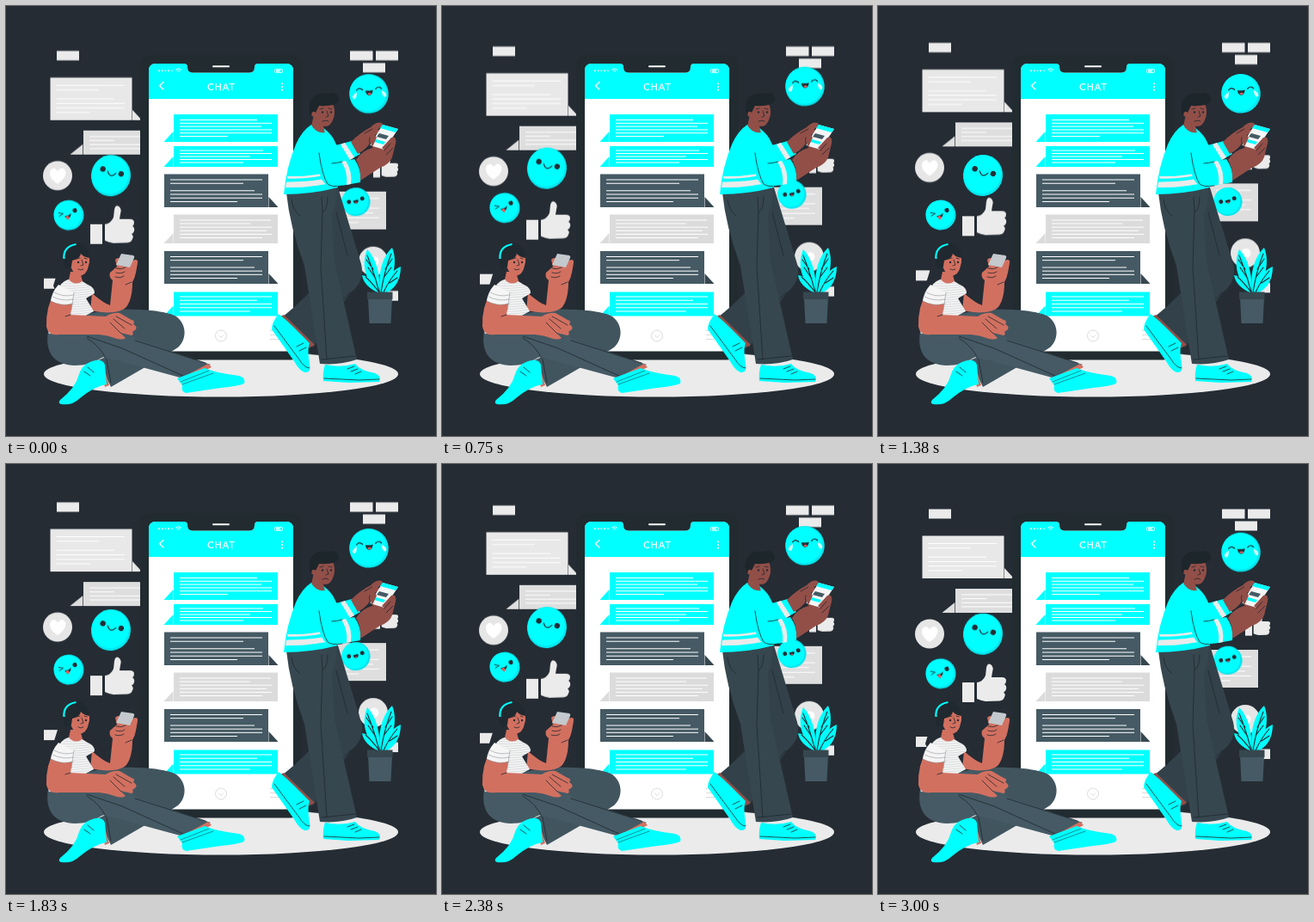
Animation, 500 px wide and 500 px high, one loop 3040 ms. Source, as an HTML page:

```html
<!DOCTYPE html>
<html lang="en">
<head>
<meta charset="utf-8">
<title>Chat</title>
<style>
  html, body { margin: 0; width: 100%; height: 100%; overflow: hidden; background: #252c34; }
  svg { display: block; width: 100vw; height: 100vh; }
  .drift { animation: float 3.04s linear -.04s infinite; --rise: -10.3px; }
  .bob { animation: float 1.52s linear -.06s infinite; --rise: -10px; }
  @keyframes float { 50% { transform: translateY(var(--rise)); } }
  .ink { fill: none; stroke: #20292f; stroke-linecap: round; stroke-linejoin: round; stroke-width: .8; }
  .white { fill: none; stroke: #fff; stroke-linecap: round; }
  .cyan { fill: #0ff; }
  .shade { fill: #06e6ee; }
  .dark { fill: #252c34; }
  .tongue { fill: #e45b5b; }
  .pale { fill: #ebebeb; }
  .girl { fill: #d27060; }
  .man { fill: #924f48; }
  .title { font: 400 11px Lato, "Open Sans", sans-serif; letter-spacing: .8px; fill: #fff; stroke: #fff; stroke-width: .25px; }
</style>
</head>
<body>
<svg viewBox="0 0 500 500">
  <defs>
    <g id="like">
      <path d="M0 22H14V45H0Z"/>
      <path d="M17 22Q24 21 27 14L28 5Q29-1 33 1Q37 4 35 10L34 16H46Q51 16 51 20Q51 23 49 24Q52 26 51 30Q50 33 48 33.500Q51 36 49 39Q48 43 43 43.500L27 44Q21 43 17 41Z"/>
    </g>
    <clipPath id="shirt"><path d="M70 319Q76 316 82 316L95 324Q103 327 103 334L93 340L102 355L54 380Q48 384 50 376Q60 358 57 345Q59 324 70 319Z"/></clipPath>
  </defs>

  <ellipse class="pale" cx="250" cy="428" rx="206" ry="26.500"/>

  <g class="drift pale">
    <path d="M59 52.500h26v11H59zM400 52.500h26.500v11H400zM430 52.500h26v11h-26zM415 66.500h26v11h-26zM44 317h17v12H44zM440 331.500h16v11.500h-16z"/>
    <g id="chats"></g>
    <circle cx="60" cy="197.500" r="17" fill="#e6e6e6"/>
    <path fill="#fff" d="M60 207C46 198 51 188 56.500 189Q59 190 60 192.500Q61 190 64 189C70 188 74 198 60 207Z"/>
    <use href="#like" x="98" y="232"/>
    <use href="#like" transform="translate(427 174) scale(.57)"/>
    <circle cx="427" cy="297" r="17" fill="#e6e6e6"/>
    <circle cx="428" cy="297" r="5.500" fill="#fff"/>
  </g>

  <g class="bob">
    <g transform="translate(122 198) rotate(15)">
      <ellipse class="shade" rx="23" ry="24"/>
      <ellipse class="cyan" cx="-1" cy="-1" rx="21.500" ry="22.500"/>
      <g class="dark"><circle cx="-11" cy="-5" r="3.200"/><circle cx="11" cy="-5" r="3.200"/></g>
      <path class="ink" style="stroke-width:1.200" d="M-5-4Q0 4 5-4"/>
    </g>
    <g transform="translate(73 244) rotate(-12)">
      <circle class="shade" r="17.500"/><circle class="cyan" cx="-1" cy="-1" r="16.200"/>
      <circle class="dark" cx="8" cy="-4" r="2.600"/>
      <path class="ink" d="M-11-5L-6-3L-11-1"/>
      <path class="dark" d="M-5 0Q0 1 3-2Q2 3-1 3Q-4 3-5 0Z"/>
      <path class="tongue" d="M-4 1Q-1 0 0 2Q0 5-2 5Q-4 4-4 1Z"/>
    </g>
    <g transform="translate(422 102.800) rotate(-4)">
      <circle class="shade" r="22.800"/><circle class="cyan" cx="-1" cy="-1" r="21.300"/>
      <path class="ink" style="stroke-width:1.200" d="M-14-5Q-11-9-7-5M8-5Q12-9 15-5"/>
      <path class="dark" d="M-4-4Q0-3 5-4Q4 2 0 2Q-3 2-4-4Z"/>
      <path class="tongue" d="M-2 0Q1-2 3 0Q1 3-2 0Z"/>
      <path fill="#d5ffff" d="M-14-3Q-14 5-18 5Q-22 2-14-3ZM15-3Q15 5 19 5Q23 2 15-3Z"/>
    </g>
    <g transform="translate(407 228.500) rotate(-14)">
      <circle class="shade" r="16.600"/><circle class="cyan" cx="-1" cy="-1" r="15.300"/>
      <g class="dark"><circle cx="-8" cy="-2" r="2.400"/><circle cx="8" cy="-2" r="2.400"/>
      <path d="M-3-2H3Q3 2 0 2Q-3 2-3-2Z"/></g>
      <path class="tongue" d="M-1.500 1Q0-.5 1.500 1Q0 2.500-1.500 1Z"/>
    </g>
  </g>

  <!-- phone -->
  <rect x="156" y="57" width="188" height="354.500" rx="13" fill="#212b30"/>
  <rect x="166" y="67" width="168" height="334.500" rx="8" fill="#fff"/>
  <path class="cyan" d="M166 108V75Q166 67 174 67H207Q211 67 211 71Q211 77.500 217 77.500H283Q289 77.500 289 71Q289 67 293 67H326Q334 67 334 75V108Z"/>
  <path fill="#212b30" d="M207 66H293V67Q289 67 289 71Q289 77.500 283 77.500H217Q211 77.500 211 71Q211 67 207 67Z"/>
  <path class="white" stroke-width="2" d="M241 70.200H259"/>
  <path class="white" stroke-width="2" stroke-dasharray="0 3.700" d="M178 75.200H193"/>
  <path class="white" d="M197.500 74Q200.500 71.500 203.500 74M199 75.800Q200.500 74.500 202 75.800"/>
  <rect x="312.500" y="73.500" width="9" height="4" rx="1" fill="none" stroke="#fff" stroke-width=".8"/>
  <path fill="#fff" d="M314 74.500h5v2h-5z"/>
  <path class="white" stroke-width="1.400" d="M183 88.500L178.500 92.700L183 97"/>
  <path class="white" stroke-width="2.200" stroke-dasharray="0 3.700" d="M321 90.300V98.500"/>
  <text class="title" x="250.400" y="98" text-anchor="middle">CHAT</text>
  <g id="talk"></g>
  <g fill="none" stroke="#dbdbdb">
    <circle cx="250" cy="383.500" r="6.500"/>
    <path d="M247 382.500L250 385.500L253 382.500M307 377.500H319M307 382.500H319M307 387.500H319"/>
  </g>

  <!-- plant -->
  <g class="cyan">
    <path d="M434 334Q416 326 414 313Q427 315 435 334Z"/>
    <path d="M433 334C417 318 413 300 420 283C431 294 436 315 434 334Z"/>
    <path d="M435 334C432 310 438 291 449 281C456 298 450 320 438 334Z"/>
    <path d="M437 334C441 317 448 308 459 303C459 320 451 330 441 334Z"/>
  </g>
  <path class="ink" style="stroke-width:1.100" d="M434 333Q425 321 418 315M434 333Q428 310 420 290M436 333Q440 308 448 288M439 333Q446 318 455 308M430 317L421 304M427 306L419 295M439 316L448 304M441 306L449 294M446 322L455 316"/>
  <path fill="#455a64" d="M421 339H449L447.500 369H422.500Z"/>
  <path fill="#37474f" d="M420 332.500H449.500V341H420Z"/>

  <!-- sitting girl -->
  <path class="dark" d="M68 284Q60 300 60 309L55 325Q58 337 69 322L80 312Z"/>
  <path fill="#41555f" d="M100 357C125 350 183 352 198 361C211 371 210 388 200 397Q188 405 122 443L107 412L150 393Z"/>
  <path fill="#455a64" d="M49 378C45 402 55 417 80 418Q98 418 113 408L125 411L206 433L238 417L152 388L118 356L90 358Z"/>
  <path class="ink" d="M94 384L135 398L208 431M94 386Q110 396 116 410M150 389L232 415M117 411L122 438"/>
  <path class="girl" d="M112 414L120 441L115 443L108 416ZM205 432L235 416L239 420L211 434Z"/>
  <path class="cyan" d="M104 412Q113 411 115 417L117 440Q103 442 86 456Q77 465 64 463Q60 462 63 458Q81 444 85 428Q89 415 104 412Z"/>
  <path class="ink" d="M91 425L98 430M95 420L102 426"/>
  <path class="cyan" d="M199 433L231 421Q245 427 271 430Q279 432 277 439Q270 442 250 444L209 450Q203 448 205 441Z"/>
  <path class="ink" style="stroke-width:.5" d="M203 437L236 424M205 440L241 427"/>
  <path class="girl" d="M100 334Q114 346 121 348L124 319Q119 315 121 310L129 303L127 295Q131 290 135 297L147 296Q154 293 153 299L151 310Q150 316 147 321Q147 342 139 351Q128 360 98 354Z"/>
  <path fill="#c3c9cd" d="M134 288L148 290Q150 291 149 293L144 304L128 301Z"/>
  <path class="ink" d="M128 305Q134 307 139 304M128 310Q134 312 138 309M127 315Q133 317 137 314M146 321L139 324"/>
  <g clip-path="url(#shirt)">
    <path fill="#f5f5f5" d="M45 310H110V390H45Z"/>
    <path id="stripes" fill="none" stroke="#c4c8cb" stroke-width=".6"/>
  </g>
  <path class="girl" d="M75 309L73 318Q80 326 89 320L86 309Z"/>
  <path class="girl" d="M57 332Q46 350 47 373Q49 384 62 382L108 382Q119 383 126 386Q135 389 139 386L133 380L146 383Q149 382 147 379L151 376Q153 373 148 370Q151 366 146 365L132 357Q124 356 116 361L75 359L77 345Z"/>
  <path class="ink" d="M75 359L69 361M125 364L138 375M128 361L146 371M121 368L134 381"/>
  <path fill="#f5f5f5" d="M61 324Q53 333 52 343Q65 350 78 346L79 333Z"/>
  <path class="ink" stroke-opacity=".35" d="M52 343Q65 350 78 346M54 338Q66 344 78 341M56 333Q67 339 78 336M79 333L76 354"/>
  <path class="girl" d="M77 288L94 286Q99 294 96 302Q94 313 85 314Q78 312 75 302Q70 303 70 297Q72 293 76 297Z"/>
  <path fill="#20292f" d="M67 292Q69 276 82 275.500Q96 277 97 293Q90 292 87 288Q86 294 77 296L76 303L70 306Q66 301 67 292Z"/>
  <path fill="none" stroke="#0ff" stroke-width="2.200" d="M67.500 294Q66 280 81.500 277"/>
  <path class="ink" d="M82 294L86 293M91 293L94 294M88 295L90 301L87 302M84 306Q87 308 90 306"/>
  <g class="dark"><circle cx="84" cy="298" r="1.200"/><circle cx="93" cy="298" r="1.200"/></g>

  <!-- leaning man -->
  <path fill="#33424a" d="M368 217L386 211L413 300Q418 320 400 334L357 397L321 362Q352 337 371 312Z"/>
  <path class="ink" d="M384 240L397 290M400 333L373 362"/>
  <path class="man" d="M319 361L323 359L359 394L352 398Z"/>
  <path class="cyan" d="M317 358Q326 365 335 374L353 392Q350 400 353 416Q355 427 347 426Q341 424 335 413L309 376Q309 368 317 358Z"/>
  <path class="ink" d="M312 372L341 411Q347 421 353 421M338 396L346 392M341 401L349 397"/>
  <path fill="#37474f" d="M326 217L384 210Q386 228 379 243L382 297L408 411Q388 418 365 416L347 302Q330 257 326 217Z"/>
  <path class="ink" d="M367 222L368 240Q374 236 374 222M368 240L366 303L373 411M367 411L406 407M332 225Q333 237 342 244"/>
  <path class="cyan" d="M371 417Q389 421 406 416Q412 424 429 427Q437 430 434 437L398 438L369 436Q368 425 371 417Z"/>
  <path class="ink" d="M370 433L410 435L434 434M397 422L405 419M401 425L409 422M406 428L413 425"/>
  <path class="cyan" d="M376 164L402 157L412 172L391 184Z"/>
  <path fill="#ebebeb" d="M389 161L394 159L405 176L400 179Z"/>
  <path class="man" d="M401 158Q412 147 424 141Q431 134 437 136Q440 138 432 144L438 144L426 152Q424 164 409 172Z"/>
  <path class="cyan" d="M355 138Q344 145 337 161Q326 187 323 219Q355 219 386 211L386 179Q387 158 374 146L366 139Z"/>
  <path fill="#ebebeb" d="M327 198Q355 199 385 191V193.500Q353 202 327 200.500ZM326 204.500Q355 205 386 198V204Q354 212 325 211Z"/>
  <path class="cyan" d="M365 151Q379 151 386 164L391 181L405 178Q414 190 412 205L379 211Q369 209 365 196Z"/>
  <path fill="#ebebeb" d="M390 181L395 180Q403 192 401 207L396 208Q398 194 390 181Z"/>
  <path class="ink" d="M364 171Q367 195 374 207Q379 211 391 209M391 181Q384 183 379 183"/>
  <path class="man" d="M407 179Q414 168 426 165Q421 157 422 152Q427 149 430 156L439 163L446 153Q455 151 453 160L449 176Q446 184 435 188L412 203Q413 189 407 179Z"/>
  <path fill="#f5f5f5" d="M438 138L456 143L440 167L423 162Z"/>
  <path class="cyan" d="M438 138L456 143L453 147L435 142Z"/>
  <path fill="#455a64" d="M434 148L445 151L442 155L431 152Z"/>
  <path class="cyan" d="M430 155L441 158L439 161L428 158Z"/>
  <path class="man" d="M437 165L448 153Q455 151 452 159L444 170ZM422 154Q428 146 431 153L426 164Z"/>
  <path class="ink" d="M440 168L447 160M442 173L450 165M423 153Q421 158 426 165M417 148L426 143"/>
  <g transform="translate(-3 -2)">
    <path class="man" d="M361 128L358 142Q365 151 374 150L371 137Z"/>
    <path fill="none" stroke="#0ff" stroke-width="2" d="M357 141Q364 152 374 150"/>
    <path class="man" d="M362 117L382 114Q387 123 384 132Q381 142 374 142Q366 140 362 131Q356 130 357 124Q360 120 363 125Z"/>
    <path fill="#1d262b" d="M358 132Q353 118 358 111Q363 102 376 104Q391 101 390 112Q387 119 367 118L363 126Q358 122 358 132Z"/>
    <path class="ink" d="M368 122L372 121M378 121L382 122M376 124L378 130L375 131M371 136Q375 134 378 136"/>
    <g class="dark"><circle cx="371" cy="125.500" r="1.200"/><circle cx="381" cy="125.500" r="1.200"/></g>
  </g>
</svg>
<script>
  const byId = id => document.getElementById(id);

  // Each end is the right edge of a text line; 0 leaves a gap.
  function bubble(x, y, w, h, tail, fill, ends, pad = 6.5, tailFill = fill) {
    const edge = tail > 0 ? x + w : x, low = y + h;
    const step = (h - 2 * pad) / (ends.length - 1);
    const lines = ends.map((end, i) => end ? `M${x + 7} ${y + pad + i * step}H${end}` : '').join('');
    return `<path fill="${fill}" d="M${x} ${y}h${w}v${h}h${-w}z"/>
      <path fill="${tailFill}" d="M${edge + tail * .5} ${low - 12}l${tail * 11} 12h${-tail * 11}z"/>
      <path d="${lines}" stroke="#fff" fill="none"/>`;
  }

  const slate = '#455a64', deep = '#37474f', cyan = '#0ff';
  const long = [298, 276, 0, 289, 298, 298, 269];
  byId('talk').innerHTML = [
    [195, 126, 121, 32, -1, cyan, [292, 309, 297, 309, 309, 258]],
    [195, 163, 121, 24, -1, cyan, [299, 309, 284, 309, 276], 5],
    [184, 195.5, 121, 38.5, 1, slate, long, 6.5, deep],
    [195, 242.5, 121, 33.5, -1, '#dbdbdb', [308, 284, 309, 303, 309, 298]],
    [184, 285, 121, 38, 1, slate, long, 6.5, deep],
    [195, 332.5, 121, 28, -1, cyan, [309, 292, 309, 309, 284], 5.5]
  ].map(b => bubble(...b)).join('');

  byId('chats').innerHTML =
    bubble(51.5, 83.5, 95, 49.5, 1, '#e8e8e8', [138, 108, 0, 126, 138, 138, 98], 9) +
    bubble(90, 145, 80, 28, -1.35, '#dedede', [156, 126, 156, 156], 7) +
    bubble(386, 216, 56, 44, -1, '#dedede', [434, 418, 434, 427, 434, 410], 8);

  byId('stripes').setAttribute('d',
    Array.from({ length: 24 }, (_, i) => `M48 ${318 + i * 2.7}Q76 ${323 + i * 2.7} 106 ${317 + i * 2.7}`).join(''));
</script>
</body>
</html>
```
